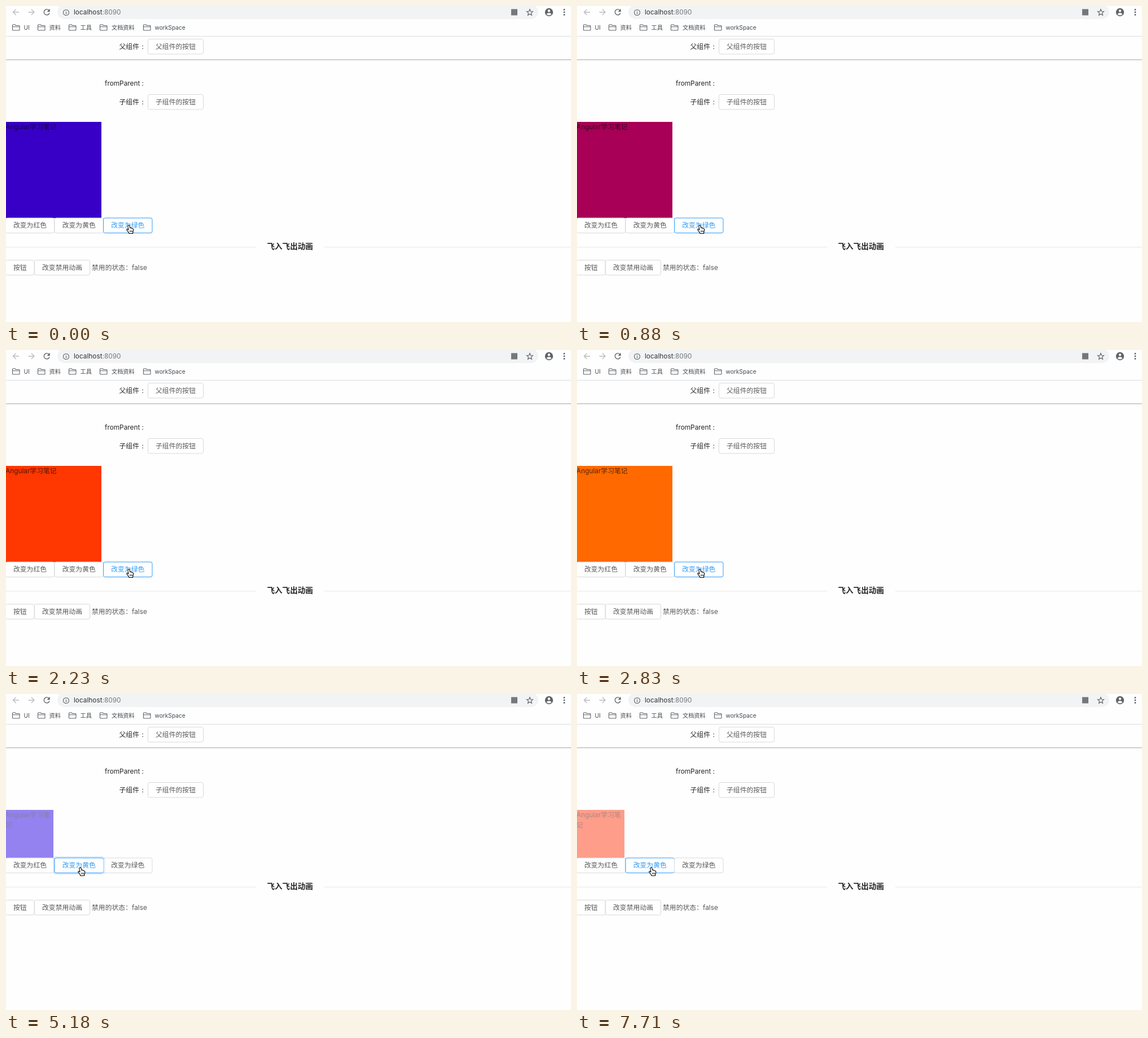
Animation of 1001x559 px, one loop 8000 ms. Source, as an HTML page:

```html
<!DOCTYPE html>
<html lang="zh-CN">
<head>
<meta charset="utf-8">
<style>
html, body { margin: 0; width: 100%; height: 100%; overflow: hidden; background: #fefefe; }
svg { display: block; }
text { font: 11.83px Inter, "Noto Sans CJK SC", "Noto Sans CJK", sans-serif; fill: #595959; white-space: pre; }
.label { fill: #262626; }
.small { font-size: 10.2px; fill: #45484c; }
.title { font-size: 13.55px; font-weight: 600; fill: #262626; }
.button rect { fill: #fff; stroke: #d9d9d9; }
.button.active rect { stroke: #2f9bf7; }
.button.active text { fill: #2f9bf7; }
.icon { fill: none; stroke: #5f6368; stroke-width: 1.4; }
.cursor path { fill: #fff; stroke: #000; stroke-width: 1.1; stroke-linejoin: round; }
</style>
</head>
<body>
<svg width="1001" height="559" viewBox="0 0 1001 559">
  <g id="toolbar">
    <rect x="91" y="-2" width="852" height="25" rx="12.5" fill="#f1f3f4"/>
    <path class="icon" style="stroke:#babcbe" d="M23 11H12.500M17.500 6L12.500 11L17.500 16M39.500 11H50M45 6L50 11L45 16"/>
    <path class="icon" d="M76 7.500A5 5 0 1 0 77 12.500"/>
    <path fill="#5f6368" d="M77.700 5V10.200H72.500Z"/>
    <circle class="icon" cx="106.500" cy="11.500" r="5" style="stroke-width:1.100"/>
    <path class="icon" style="stroke-width:1.200" d="M106.500 10.800V14.300M106.500 8.300V9.500"/>
    <text x="120" y="15.300" fill="#333"><tspan fill="#303236">localhost</tspan><tspan fill="#74787c">:8090</tspan></text>
    <rect x="895" y="5.500" width="11" height="11" fill="#74787c"/>
    <path class="icon" style="stroke-width:1.200" d="M928 5.800L929.500 9.500L933.500 9.800L930.400 12.400L931.400 16.300L928 14.200L924.600 16.300L925.600 12.400L922.500 9.800L926.500 9.500Z"/>
    <circle cx="962" cy="11" r="7.200" fill="#5f6368"/>
    <circle cx="962" cy="8.500" r="2.200" fill="#fff"/>
    <path fill="#fff" d="M957.600 14.600C958.500 11.300 965.500 11.300 966.400 14.600C964 17.200 960 17.200 957.600 14.600Z"/>
    <g fill="#5f6368"><circle cx="989" cy="6.500" r="1.400"/><circle cx="989" cy="11" r="1.400"/><circle cx="989" cy="15.500" r="1.400"/></g>
  </g>
  <path stroke="#dadce0" d="M0 53.500H1001"/>
  <path stroke="#a0a0a0" d="M0 95H1001"/>
  <text class="label" x="200.500" y="76">父组件</text><text class="label" x="240.500" y="76">:</text>
  <text class="label" x="175" y="141">fromParent</text><text class="label" x="240.500" y="141">:</text>
  <text class="label" x="200.500" y="174.300">子组件</text><text class="label" x="240.500" y="174.300">:</text>
  <g id="upper"></g>
  <g id="box">
    <rect id="fill" y="205"/>
    <text x="-1" y="218.300" style="fill:#000;fill-opacity:.65"><tspan id="line1"></tspan><tspan id="line2" x="-1" y="236"></tspan></text>
  </g>
  <g id="lower">
    <path stroke="#e8e8e8" d="M0 426.500H443M564 426.500H1001"/>
    <text class="title" x="462.500" y="430.300">飞入飞出动画</text>
    <text x="152" y="467.300">禁用的状态：</text><text x="223" y="467.300">false</text>
  </g>
  <g id="pointers" class="cursor">
    <g id="hand">
      <path d="M4 1C5.300.6 6 1.500 6.200 2.600L6.800 5.600C8 5 9 5.400 9.200 6.200C10.200 5.800 11 6.200 11.200 7C12.400 6.800 12.900 7.600 12.800 9C12.700 11 12 12.500 11.600 14V15.500H5L4.600 13.800C3 12 1.800 10.200.8 9C.3 7.800 1.600 7 2.800 8L4 9L2.800 3C2.600 2 3 1.200 4 1Z" transform="translate(-4 -1)"/>
      <path d="M2.700 9V12M4.600 9V12M6.500 9V12" style="stroke-width:.8"/>
    </g>
    <path id="arrow" style="fill:#000;stroke:#fff" d="M0 0V12L3 9.300L5 14L7 13.200L5 8.600H9Z"/>
    <path id="beam" style="fill:none;stroke-width:1.400" d="M-3.500 -6.500Q0 -6.500 0 -4.500Q0 -6.500 3.500 -6.500M0 -4.500V5.500M-3.500 7.500Q0 7.500 0 5.500Q0 7.500 3.500 7.500M-2 2.500H2"/>
  </g>
</svg>
<script>
const LOOP = 8000, SHRINK = 3550, MOVE = 4150, CLICK = 5030;
const ticks = [0, 140, 290, 430, 580, 730, 880, 1030, 1180, 1330, 1480, 1630, 1930, 2230,
  2530, 2830, 3120, 3410, SHRINK, MOVE, 4300, 4450, 4590, 4740, 4880, CLICK, 5180, 5470,
  5620, 5920, 6220, 6520, 6670, 6820];

const $ = id => document.getElementById(id);

function make(tag, attrs, parent) {
  const el = document.createElementNS('http://www.w3.org/2000/svg', tag);
  for (const key in attrs) el.setAttribute(key, attrs[key]);
  return parent.appendChild(el);
}

function addButton(parent, label, x, y, width) {
  const g = make('g', { class: 'button' }, parent);
  make('rect', { x, y, width, height: 26.5, rx: 3 }, g);
  make('text', { x: x + width / 2, y: y + 17.4, 'text-anchor': 'middle' }, g).textContent = label;
  return g;
}

function addFolder(x, label, textX) {
  make('path', {
    class: 'icon', style: 'stroke-width:1.1',
    d: `M${x + .5} 42V34Q${x + .5} 33 ${x + 1.5} 33H${x + 5}L${x + 6.5} 34.500H${x + 12}Q${x + 13} 34.500 ${x + 13} 35.500V42Q${x + 13} 43 ${x + 12} 43H${x + 1.5}Q${x + .5} 43 ${x + .5} 42ZM${x + .5} 36.700H${x + 13}`
  }, $('toolbar'));
  make('text', { class: 'small', x: textX, y: 41.7 }, $('toolbar')).textContent = label;
}

addFolder(11, 'UI', 31.5);
addFolder(56, '资料', 76.5);
addFolder(111, '工具', 131.5);
addFolder(166, '文档资料', 187);
addFolder(243, 'workSpace', 263.5);

addButton($('upper'), '父组件的按钮', 251.5, 58.5, 98);
addButton($('upper'), '子组件的按钮', 251.5, 156.5, 98);
addButton($('lower'), '按钮', -.5, 449.5, 50.5);
addButton($('lower'), '改变禁用动画', 50.5, 449.5, 98);
addButton($('lower'), '改变为红色', -.5, 375, 86);
const yellow = addButton($('lower'), '改变为黄色', 86, 375, 86.5);
const green = addButton($('lower'), '改变为绿色', 172.5, 375, 86.5);
const wave = make('rect', { fill: 'none', stroke: '#1890ff' }, $('lower'));

const mix = (a, b, p) => a + (b - a) * p;

function boxColor(t) {
  if (t < SHRINK) {
    const p = (t + 440) / 2000;
    return p < 1 ? [255 * p, 0, 255 * (1 - p)] : [255, 165 * (p - 1), 0];
  }
  if (t < CLICK) return [39, 129, 23];
  const p = (t - CLICK) / (6820 - CLICK);
  return [mix(22, 255, p), mix(4, 63, p), mix(246, 25, p)];
}

function placePointer(t) {
  let x = 217, y = 388, kind = 'hand';
  if (t >= MOVE) {
    const p = Math.min((t - MOVE) / 730, 1), e = 1 - (1 - p) ** 2;
    x = mix(212, 131, e);
    y = mix(385, 307, e);
    kind = y > 364 ? 'beam' : y > 317 ? 'arrow' : 'hand';
  }
  for (const el of $('pointers').children) el.style.display = el.id === kind ? '' : 'none';
  $('pointers').setAttribute('transform', `translate(${x} ${y})`);
  return t >= MOVE && kind === 'hand';
}

function drawWave(t) {
  const age = t - CLICK, on = age >= 0 && age < 590;
  wave.style.display = on ? '' : 'none';
  if (!on) return;
  const s = 5 * Math.min(1, Math.sqrt(age / 400));
  const attrs = {
    x: 86 - s / 2, y: 375 - s / 2, width: 86.5 + s, height: 26.5 + s, rx: 3 + s / 2,
    'stroke-width': s, opacity: .2 * (1 - age / 600)
  };
  for (const key in attrs) wave.setAttribute(key, attrs[key]);
}

function draw(now) {
  const time = now % LOOP, t = ticks.findLast(tick => tick <= time);
  const small = t >= SHRINK, size = small ? 84 : 169;
  $('fill').setAttribute('width', size);
  $('fill').setAttribute('height', size + 1);
  $('fill').setAttribute('fill', `rgb(${boxColor(t).map(Math.round)})`);
  $('box').setAttribute('opacity', small ? .5 : 1);
  $('line1').textContent = small ? 'Angular学习笔' : 'Angular学习笔记';
  $('line2').textContent = small ? '记' : '';
  $('lower').setAttribute('transform', `translate(0 ${small ? -85 : 0})`);
  const hover = placePointer(t);
  yellow.classList.toggle('active', hover);
  green.classList.toggle('active', t < CLICK);
  drawWave(t);
}

const start = performance.now();
function loop() {
  draw(performance.now() - start);
  requestAnimationFrame(loop);
}
loop();
</script>
</body>
</html>
```
